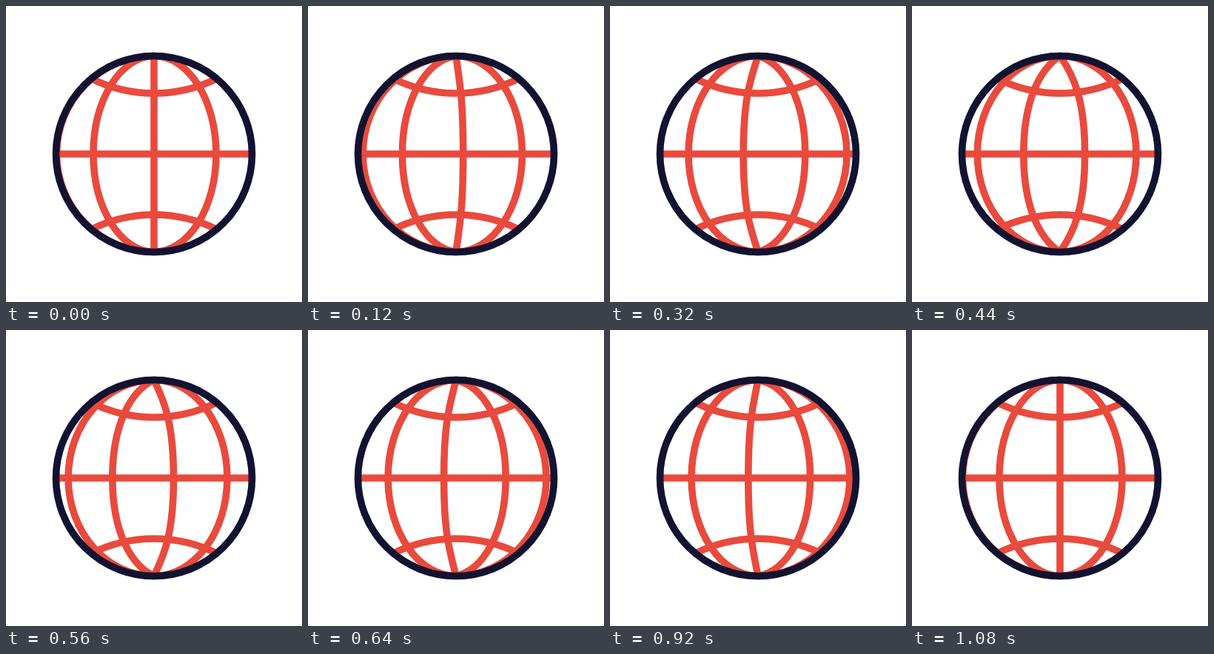
An HTML page that plays this animation: 400 by 400 pixels, repeating every 1.2 s.

```html
<!DOCTYPE html>
<html lang="en">
<head>
<meta charset="utf-8">
<title>Spinning globe</title>
<style>
  html, body { margin: 0; width: 100%; height: 100%; overflow: hidden; background: #fff; }
  svg { display: block; width: 100%; height: 100%; }
  path, circle { fill: none; stroke-width: 9.6; }
  .grid { stroke: #e94a3d; stroke-linejoin: round; }
  .rim { stroke: #121331; }
</style>
</head>
<body>
<svg viewBox="-200 -200 400 400">
  <g class="grid">
    <path d="M-132 0H132"/>
    <path d="M-85 -102A191 191 0 0 0 85 -102"/>
    <path d="M-85 102A191 191 0 0 1 85 102"/>
    <path class="meridian"/>
    <path class="meridian"/>
    <path class="meridian"/>
    <path class="meridian"/>
  </g>
  <circle class="rim" r="132.5"/>
</svg>
<script>
const LOOP = 1200, STEP = 40;
const R = 132.5, KAPPA = 0.5523, LIFT = 44;

// Equator crossings of the resting meridians, left rim to right rim.
const stops = [-131.5, -82, 0, 84, 131.5];

// Spin progress in meridian spacings: time, turn, speed per ms.
const spin = [
  [0, 0, 0.0001],
  [240, 0.44, 0.0036],
  [440, 1.4, 0.0064],
  [560, 2.315, 0.0065],
  [760, 3.38, 0.004],
  [920, 3.84, 0.002],
  [1080, 4, 0]
];

const meridians = document.querySelectorAll('.meridian');

function turnAt(t) {
  if (t >= 1080) return 4;
  const i = spin.findIndex(k => k[0] > t);
  const [t0, q0, v0] = spin[i - 1], [t1, q1, v1] = spin[i];
  const d = t1 - t0, s = (t - t0) / d, e = s * s * (3 - 2 * s);
  return q0 + (q1 - q0) * e
    + d * s * (1 - s) * (v0 * (1 - s) - v1 * s);
}

// Half ellipse whose poles sharpen as it nears the straight centre line.
function meridianPath(x) {
  const pole = R - LIFT * Math.max(0, 1 - Math.abs(x) / 83);
  const cx = x * KAPPA, cy = R * KAPPA;
  return `M0 ${-R}C${cx} ${-pole} ${x} ${-cy} ${x} 0S${cx} ${pole} 0 ${R}`;
}

function draw(now) {
  const t = Math.floor((now % LOOP) / STEP) * STEP;
  const u = turnAt(t) % 1;
  meridians.forEach((m, i) => {
    m.setAttribute('d', meridianPath(stops[i] + (stops[i + 1] - stops[i]) * u));
  });
}

let start;
function tick(now) {
  start ??= now;
  draw(now - start);
  requestAnimationFrame(tick);
}
draw(0);
requestAnimationFrame(tick);
</script>
</body>
</html>
```
